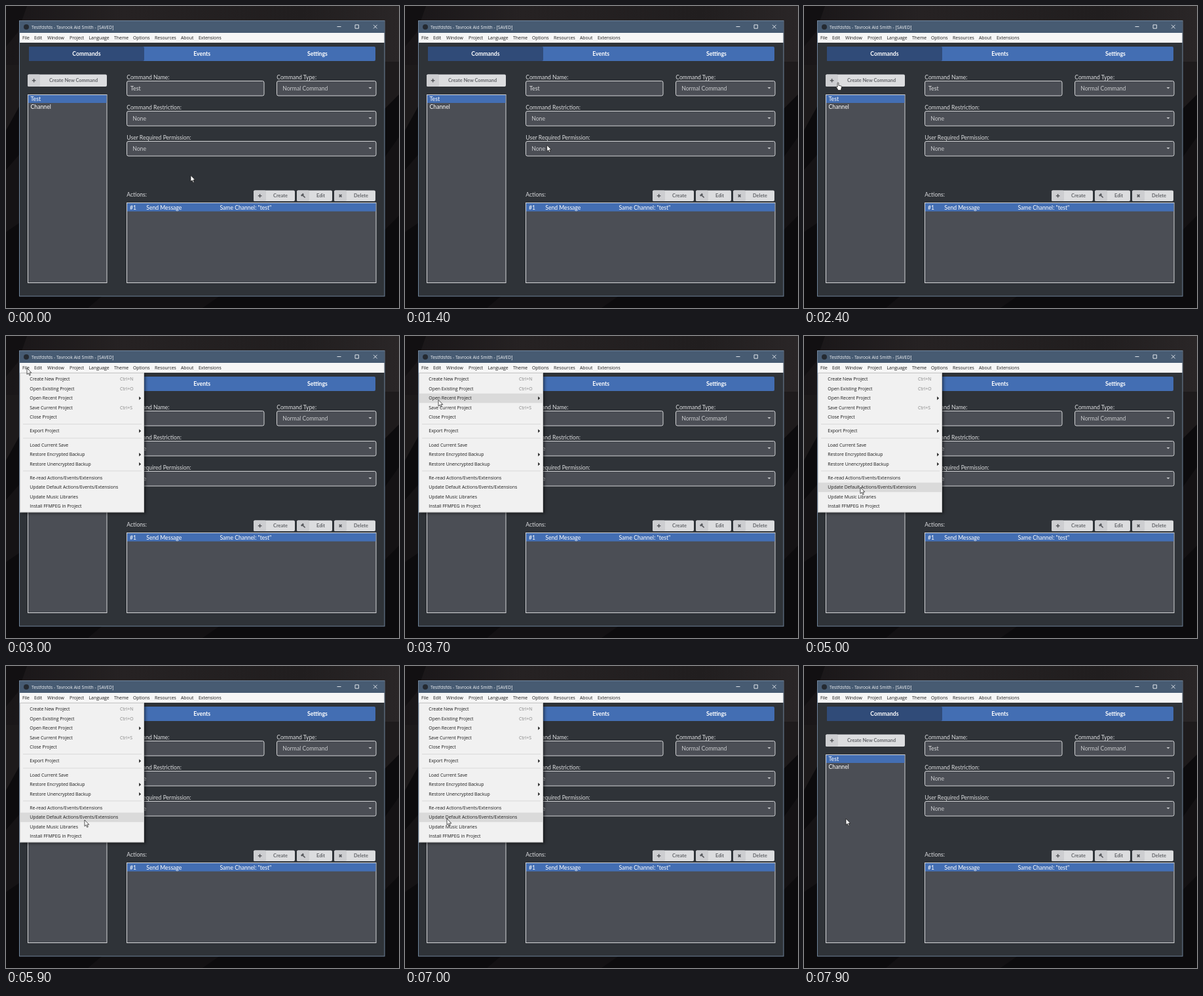
Write an HTML page that moves like this. It is 600 px wide and 461 px high and loops after 8 s.

```html
<!DOCTYPE html>
<html lang="en">
<head>
<meta charset="utf-8">
<title>Bot editor</title>
<style>
html, body { margin: 0; width: 100%; height: 100%; overflow: hidden; background: #0c0b0d; }
svg { display: block; width: 600px; height: 461px; }
text { font-family: Lato, sans-serif; font-size: 8.6px; fill: #dcdddf; white-space: pre; }
.ui { font-family: "Open Sans", "Noto Sans", sans-serif; font-size: 6.9px; fill: #1b1b1b; }
.title { font-size: 6.8px; fill: #f0f2f5; }
.key { fill: #858585; }
.tab { font-weight: 700; font-size: 8.7px; fill: #fff; text-anchor: middle; }
.btn { font-weight: 700; font-size: 7.4px; fill: #64666a; text-anchor: middle; }
.val { font-size: 8.7px; }
.dim { font-size: 8.7px; fill: #c9cacd; }
.sel { fill: #fff; }
</style>
</head>
<body>
<svg id="stage" viewBox="0 0 600 461">
  <defs>
    <linearGradient id="wall" x2="1" y2="0">
      <stop offset="0" stop-color="#191618"/>
      <stop offset=".3" stop-color="#262223"/>
      <stop offset=".75" stop-color="#211e1f"/>
      <stop offset="1" stop-color="#2a2627"/>
    </linearGradient>
    <filter id="shade" x="-10%" y="-10%" width="120%" height="120%"><feGaussianBlur stdDeviation="2"/></filter>
  </defs>
  <g id="desk"></g>
  <g id="app"></g>
  <g id="menu"></g>
  <path id="arrow" d="M0 0V9.6L2.2 7.6L3.8 11.2L5.3 10.5L3.8 7.1H6.8Z" fill="#fff" stroke="#111" stroke-width=".7"/>
  <path id="hand" d="M-.9 .4Q0-.8 .9 .4V4.3L4.5 5Q5.7 5.3 5.5 6.6L4.7 10V11.6H-.6V10L-3 6.8Q-2.8 5.3-.9 6.8Z" fill="#fff" stroke="#111" stroke-width=".7"/>
</svg>
<script>
const $ = id => document.getElementById(id);
const rect = (x, y, w, h, fill, more = '') => `<rect x="${x}" y="${y}" width="${w}" height="${h}" fill="${fill}" ${more}/>`;
const text = (x, y, s, cls = '') => `<text x="${x}" y="${y}" class="${cls}">${s}</text>`;
const line = (d, color, w = 1) => `<path d="${d}" fill="none" stroke="${color}" stroke-width="${w}"/>`;
const poly = (d, fill) => `<path d="${d}" fill="${fill}"/>`;

const blue = '#436eb3', field = '#4b4e55', edge = '#d4d5d7';
const box = (x, y, w, h, r = 0) => rect(x, y, w, h, field, `rx="${r}" stroke="${edge}"`);
const caret = (x, y) => poly(`M${x - 2.5} ${y - 1.2}h5l-2.5 2.6z`, '#c8c9cb');
const select = (x, y, w, s) => box(x, y, w, 22.5, 2.5) + text(x + 8.7, y + 14.5, s, 'dim') + caret(556, y + 10.7);
const button = (x, y, w, h, s, mid, icon) =>
  rect(x, y, w, h, '#dcdddf', 'rx="2"') + rect(x, y, 19, h, '#cdced1', 'rx="2"') +
  text(mid, y + h / 2 + 2.6, s, 'btn') + `<g transform="translate(${x + 9.6} ${y + h / 2})">${icon}</g>`;

const plus = line('M-2.8 0H2.8M0-2.8V2.8', '#56585c', 1.5);
const cross = line('M-1.9-1.9L1.9 1.9M1.9-1.9L-1.9 1.9', '#56585c', 1.6);
const gavel = line('M-2.8 .2L.6-3', '#56585c', 2.5) + line('M-.6-.9L3 2.8', '#56585c', 1.6);

$('desk').innerHTML =
  rect(0, 0, 600, 461, '#0c0b0d') +
  rect(0, 0, 600, 90, 'url(#wall)') +
  poly('M0 0H32L18 40L0 62Z', '#121012') +
  poly('M0 90H22V150L0 190Z', '#1d1a1b') +
  poly('M0 250L22 225V330L0 345Z', '#151315') +
  poly('M575 85H600V135L575 160Z', '#1e1b1c') +
  poly('M575 235L600 200V320L575 345Z', '#141214') +
  poly('M150 440H330L300 461H125Z', '#131113');

const bar = [['File', 25], ['Edit', 43], ['Window', 63], ['Project', 97], ['Language', 126.5],
  ['Theme', 165], ['Options', 194], ['Resources', 227], ['About', 267], ['Extensions', 294]];

$('app').innerHTML =
  rect(20.5, 22.5, 557.5, 420.5, '#2f3338', 'stroke="#70859c"') +
  rect(21, 23, 556.5, 18, '#475b72') +
  '<circle cx="31" cy="32" r="4" fill="#252a31"/>' +
  text(39, 34.6, 'Testfdsfds - Tavrook Aid Smith - [SAVED]', 'ui title') +
  line('M505.5 31.5h6M533 28.8h5.4v5.4h-5.4zM561 28.8l5.6 5.6M566.6 28.8l-5.6 5.6', '#f0f2f5', .9) +
  rect(21, 41, 556.5, 15, '#f6f6f6') +
  bar.map(([s, x]) => text(x, 51.3, s, 'ui')).join('') +
  rect(35, 62, 529, 22, blue, 'rx="2"') +
  rect(35, 62, 176, 22, '#304b78', 'rx="2"') +
  ['Commands', 'Events', 'Settings'].map((s, i) => text(123 + i * 176.2, 76.2, s, 'tab')).join('') +

  button(33, 104.5, 121, 18.5, 'Create New Command', 103, plus) +
  box(33.5, 135.5, 120.5, 287) +
  rect(34, 136, 119.5, 12, blue) +
  text(37.5, 145.2, 'Test', 'val sel') + text(37.5, 157.4, 'Channel', 'val sel') +

  text(184.3, 112, 'Command Name:') + box(184.5, 114.5, 209.5, 22.5, 2.5) + text(190, 129, 'Test', 'val') +
  text(413.3, 112, 'Command Type:') + select(413.5, 114.5, 151.5, 'Normal Command') +
  text(184.3, 158, 'Command Restriction:') + select(184.5, 160.5, 380.5, 'None') +
  text(184.3, 204, 'User Required Permission:') + select(184.5, 206.5, 380.5, 'None') +

  text(184.3, 291, 'Actions:') +
  button(378, 281.5, 63, 16.5, 'Create', 419, plus) +
  button(444, 281.5, 54, 16.5, 'Edit', 480.5, gavel) +
  button(501, 281.5, 63, 16.5, 'Delete', 542, cross) +
  box(184.5, 300.5, 380.5, 122) +
  rect(185, 301, 379.5, 12.5, blue) +
  text(189, 310.8, '#1', 'sel') + text(214.3, 310.8, 'Send Message', 'sel') +
  text(326.5, 310.8, 'Same Channel: "test"', 'sel');

// Menu rows: label, centre, shortcut or '>' for a submenu
const rows = [
  ['Create New Project', 66, 'Ctrl+N'], ['Open Existing Project', 80.5, 'Ctrl+O'],
  ['Open Recent Project', 95, '>'], ['Save Current Project', 109.5, 'Ctrl+S'],
  ['Close Project', 124], ['Export Project', 145, '>'], ['Load Current Save', 166.5],
  ['Restore Encrypted Backup', 181, '>'], ['Restore Unencrypted Backup', 195.5, '>'],
  ['Re-read Actions/Events/Extensions', 216.5], ['Update Default Actions/Events/Extensions', 231],
  ['Update Music Libraries', 245.5], ['Install FFMPEG in Project', 260]];
const extra = (y, s) => !s ? '' : s === '>' ? poly(`M203.2 ${y - 2.8}v5.6l2.9-2.8z`, '#222') : text(174, y + 2.4, s, 'ui key');

$('menu').innerHTML =
  rect(24, 59, 189, 212, '#000', 'opacity=".5" filter="url(#shade)"') +
  rect(21.5, 56.5, 189, 212.5, '#f1f1f1', 'stroke="#c6c6c6"') +
  rect(22, 0, 188, 14.5, '#dadada', 'id="hover"') +
  [134.5, 156, 206].map(y => line(`M26 ${y}H207`, '#d9d9d9')).join('') +
  rows.map(([s, y, e]) => text(36.3, y + 2.4, s, 'ui') + extra(y, e)).join('');

// Pointer path: time, x, y
const path = [
  [0, 282, 258.5], [500, 282, 258.5], [1000, 295, 262], [1100, 295, 262], [2000, 60, 113],
  [2400, 52, 117], [2500, 52, 117], [2900, 32, 49], [3200, 32, 49], [3700, 51, 97.5],
  [4100, 80, 186], [4300, 87, 214], [4600, 90, 247], [5000, 86, 231], [5200, 55, 232],
  [5300, 55, 232], [5700, 170, 232], [5900, 120, 235], [6200, 95, 235], [6900, 64, 233], [8000, 64, 233]];

function pointer(t) {
  const i = path.findIndex(p => p[0] > t);
  const [t0, x0, y0] = path[i - 1], [t1, x1, y1] = path[i];
  const k = (t - t0) / (t1 - t0);
  return [x0 + (x1 - x0) * k, y0 + (y1 - y0) * k];
}
const show = (id, on) => $(id).style.display = on ? '' : 'none';

function draw(now) {
  const t = Math.floor(now % 8000 / 100) * 100;
  const [x, y] = pointer(t);
  const open = t >= 3000 && t < 7400;
  const row = rows.find(r => Math.abs(y - r[1]) <= 7.25);
  const link = !open && x > 33 && x < 154 && y > 104.5 && y < 123;
  show('menu', open);
  show('hover', row);
  if (row) $('hover').setAttribute('y', row[1] - 7.25);
  show('hand', link);
  show('arrow', !link);
  for (const id of ['hand', 'arrow']) $(id).setAttribute('transform', `translate(${x} ${y})`);
}
const start = performance.now();
function tick() {
  draw(performance.now() - start);
  requestAnimationFrame(tick);
}
tick();
</script>
</body>
</html>
```
